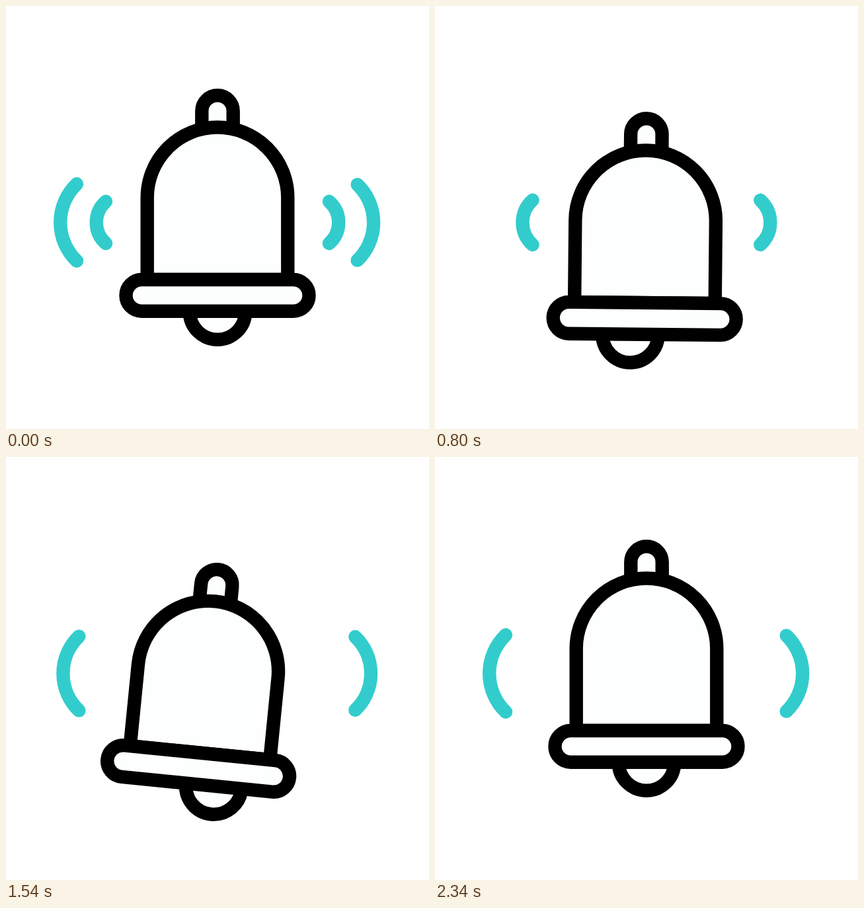
Recreate the animation shown at these times as an HTML page. Size 640 px wide and 640 px high, loop 2400 ms.

```html
<!DOCTYPE html>
<html lang="en">
<head>
<meta charset="utf-8">
<title>Ringing bell</title>
<style>
  html, body { margin: 0; width: 100%; height: 100%; overflow: hidden; background: #fff; }
  svg { display: block; width: 100vw; height: 100vh; }
  .line { fill: #fdfffe; stroke: #000; stroke-width: 20.4; }
  .wave { fill: none; stroke: #3cc; stroke-width: 20.4; stroke-linecap: round; }
</style>
</head>
<body>
<svg viewBox="0 0 640 640">
  <path class="wave" id="wave"/>
  <path class="wave" id="lastWave"/>
  <g class="line" id="bell">
    <circle id="clapper" cx="320" cy="462.5" r="42.2"/>
    <path d="M296.3 186V158.9a23.7 23.7 0 0 1 47.4 0V186"/>
    <path d="M213.7 414V289.8a106.3 106.3 0 0 1 212.6 0V414z"/>
    <rect x="181.5" y="414" width="277" height="47.8" rx="23.9"/>
  </g>
</svg>
<script>
const LOOP = 2400, STEP = 20, WAVE = 260, WAVES_END = 2340;
const PIVOT = 146, DROP = 35;

// Each swing reaches its first side, turns over a number of times, then settles.
const ring = { first: 246, half: 223, turns: 6, size: 6.05, last: 6.05, end: 2000 };
const knock = { first: 204, half: 219, turns: 7, size: 26, last: 18, end: 2150 };

const byId = id => document.getElementById(id);
const mix = (a, b, p) => a + (b - a) * p;

function ease(x) {
  x = Math.min(Math.max(x, 0), 1);
  return x < .5 ? 4 * x ** 3 : 1 - 4 * (1 - x) ** 3;
}

const lastTurn = s => s.first + s.half * s.turns;

// 0 to 1 as the motion starts, back to 0 as it settles.
function presence(s, t) {
  const stop = lastTurn(s);
  return ease(t / s.first) - ease((t - stop) / (s.end - stop));
}

function sway(s, t) {
  const beat = Math.min(Math.max((t - s.first) / s.half, 0), s.turns);
  const n = Math.floor(beat);
  const side = k => (k % 2 ? -1 : 1) * (k < s.turns ? s.size : s.last);
  return mix(side(n), side(n + 1), ease(beat - n)) * presence(s, t);
}

// An arc centred on the middle line; p runs from the inner to the outer place.
function arc(p, mirror) {
  const x = mix(151, 107, p), half = mix(31.7, 58.2, p);
  const depth = x - mix(136.7, 82.2, p);
  const r = (half * half + depth * depth) / (2 * depth);
  const px = mirror ? 640 - x : x;
  return `M${px} ${327.5 - half}A${r} ${r} 0 0 ${+mirror} ${px} ${327.5 + half}`;
}

// The right arc travels slightly less far.
const arcs = p => arc(p, false) + arc(p * .97, true);

function draw(t) {
  byId('bell').setAttribute('transform',
    `translate(0 ${DROP * presence(ring, t)}) rotate(${sway(ring, t)} 320 ${PIVOT})`);
  byId('clapper').setAttribute('cx', 320 + sway(knock, t));

  const age = t % WAVE;
  byId('wave').setAttribute('d', t < WAVES_END ? arcs(age / WAVE) : '');
  byId('lastWave').setAttribute('d', age < STEP ? arcs(1) : '');
}

const start = performance.now();
function tick() {
  const t = (performance.now() - start) % LOOP;
  draw(Math.min(Math.floor(t / STEP) * STEP, WAVES_END));
  requestAnimationFrame(tick);
}
tick();
</script>
</body>
</html>
```
